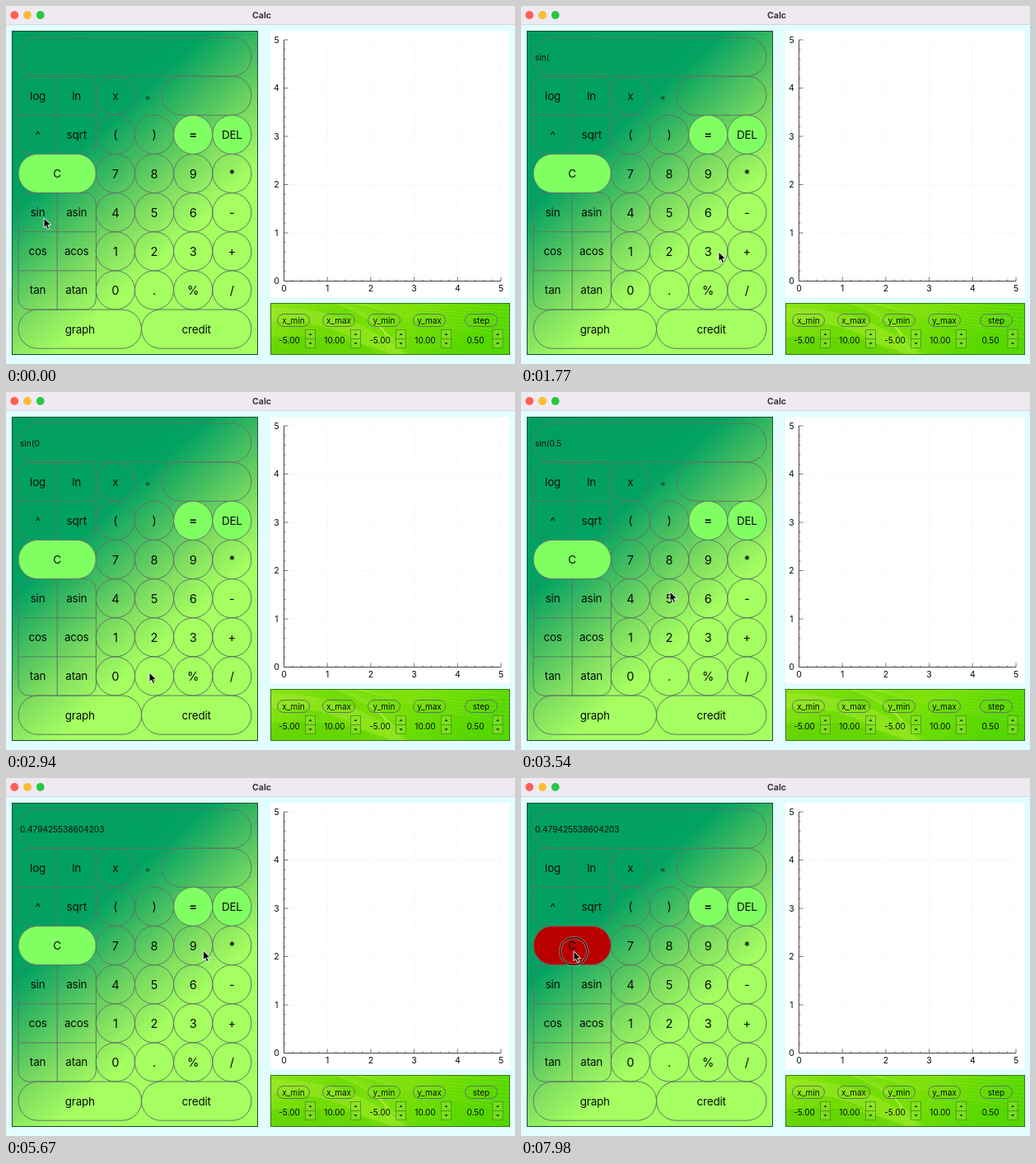
Animation of 618 by 434 pixels, one loop 8000 ms. Source, as an HTML page:

```html
<!DOCTYPE html>
<html lang="en">
<head>
<meta charset="utf-8">
<title>Calc</title>
<style>
  html, body { margin: 0; width: 100%; height: 100%; overflow: hidden; background: #e2fdff; }
  svg { display: block; }
  text { font-family: Inter, "Open Sans", sans-serif; font-size: 10px; fill: #050f08; dominant-baseline: central; text-anchor: middle; }
  .key { font-size: 13.4px; letter-spacing: -.15px; }
  .digit { font-size: 14.5px; }
  .bold { font-weight: 600; }
  .line { fill: none; stroke: #5d7766; stroke-width: 1; }
  .lit { fill: #80ff62; }
  .down { fill: #b90000; }
</style>
</head>
<body>
<svg id="stage" width="618" height="434" viewBox="0 0 618 434">
  <defs>
    <linearGradient id="face" gradientUnits="userSpaceOnUse" x1="7" y1="30" x2="337" y2="390">
      <stop offset="0" stop-color="#009f61"/>
      <stop offset=".33" stop-color="#02a262"/>
      <stop offset=".43" stop-color="#3dba61"/>
      <stop offset=".56" stop-color="#82df60"/>
      <stop offset=".67" stop-color="#a5ff61"/>
      <stop offset="1" stop-color="#a5ff61"/>
    </linearGradient>
    <linearGradient id="strip" x2="1" y2=".25">
      <stop offset="0" stop-color="#8ee517"/>
      <stop offset=".3" stop-color="#70dc04"/>
      <stop offset=".6" stop-color="#79e006"/>
      <stop offset="1" stop-color="#55d700"/>
    </linearGradient>
    <clipPath id="stripClip"><path d="M321 360H612V423H321Z"/></clipPath>
  </defs>
  <g id="scene"></g>
  <text id="entry" x="17" y="62" style="text-anchor:start;font-size:10.1px"></text>
  <g id="pointer">
    <g id="ring" fill="none">
      <circle r="16.5" stroke="#e8ffe8" stroke-opacity=".45" stroke-width="3"/>
      <circle r="16.5" stroke="#101010" stroke-width="1.3"/>
    </g>
    <path d="M0 0V11.6L2.6 9.2 4.5 13.6 6.7 12.7 4.8 8.4H8.5Z" fill="#000" stroke="#fff" stroke-width=".9"/>
  </g>
</svg>
<script>
const byId = id => document.getElementById(id);
const parts = [];
const rect = (x, y, w, h, attrs) =>
  parts.push(`<rect x="${x}" y="${y}" width="${w}" height="${h}" ${attrs}/>`);
const path = (d, attrs) => parts.push(`<path d="${d}" ${attrs}/>`);
const text = (x, y, label, attrs = '') =>
  parts.push(`<text x="${x}" y="${y}" ${attrs}>${label}</text>`);

const CELL = 47.15, LEFT = 15, TOP = 38;
const colX = c => LEFT + c * CELL;
const rowY = r => TOP + r * CELL;

function pill(x0, x1, row, label = '', cls = 'line', attrs = '', textClass = 'key') {
  const y = rowY(row);
  rect(x0, y, x1 - x0, CELL, `rx="23.5" class="line ${cls}" ${attrs}`);
  if (label) text((x0 + x1) / 2, y + CELL / 2, label, `class="${textClass}"`);
}

function keyBlock(row, rows) {
  const x = colX(0), y = rowY(row), h = rows.length * CELL;
  rect(x, y, 2 * CELL, h, 'rx="13" class="line"');
  path(`M${colX(1)} ${y}v${h}`, 'class="line"');
  rows.forEach((labels, r) => {
    if (r) path(`M${x} ${rowY(row + r)}h${2 * CELL}`, 'class="line"');
    labels.forEach((label, c) =>
      text(colX(c + .5), rowY(row + r + .5), label, 'class="key"'));
  });
}

function drawWindow() {
  rect(0, 0, 618, 434, 'fill="#e2fdff"');
  rect(0, 0, 618, 22.5, 'fill="#efeaf2"');
  path('M0 22.5H618', 'stroke="#d9d4dc"');
  ['#fe5f57', '#febc2e', '#28c840'].forEach((color, i) =>
    parts.push(`<circle cx="${10.3 + i * 15.7}" cy="11" r="4.9" fill="${color}"/>`));
  text(310.5, 11, 'Calc', 'style="font-weight:700;font-size:10.5px;fill:#38343b"');
}

function drawKeypad() {
  rect(7.5, 30.5, 298, 392, 'fill="url(#face)" stroke="#174d2d"');
  pill(colX(0), colX(6), 0);
  pill(189, colX(6), 1);
  keyBlock(1, [['log', 'ln'], ['^', 'sqrt']]);
  keyBlock(4, [['sin', 'asin'], ['cos', 'acos'], ['tan', 'atan']]);
  pill(colX(2), colX(3), 1, 'x');
  text(172, 110, '=');
  pill(colX(0), colX(2), 3, 'C', 'lit', 'id="clear"');
  ['( ) = DEL', '7 8 9 *', '4 5 6 -', '1 2 3 +', '0 . % /'].forEach((row, r) =>
    row.split(' ').forEach((label, c) => {
      const lit = label === '=' || label === 'DEL';
      const style = label === 'DEL' ? 'key' : /[=*]/.test(label) ? 'digit bold' : 'digit';
      pill(colX(c + 2), colX(c + 3), r + 2, label, lit ? 'lit' : '', '', style);
    }));
  pill(colX(0), 164.5, 7, 'graph');
  pill(164.5, colX(6), 7, 'credit');
}

function drawPlot() {
  const x0 = 337.5, y0 = 333.5, dx = 52.7, dy = 58.5;
  rect(321, 30, 291, 323, 'fill="#fff"');
  for (let i = 0; i <= 25; i++) {
    const major = i % 5 === 0, n = i / 5, x = x0 + n * dx, y = y0 - n * dy;
    const tick = major ? 5 : 2;
    if (major) {
      path(`M${x} 41V333M338 ${y}H601`, 'stroke="#ededed" stroke-dasharray="1 1.5" fill="none"');
      text(x, 342.5, n, 'style="font-size:10.5px"');
      text(328.5, y, n, 'style="font-size:10.5px"');
    }
    path(`M${x} ${y0}v${-tick}M${x0} ${y}h${tick}`, 'stroke="#555" stroke-width=".8"');
  }
  path(`M${x0} 41V${y0}H601`, 'fill="none" stroke="#444"');
}

function drawSettings() {
  rect(321, 360, 291, 63, 'fill="url(#strip)"');
  parts.push('<g clip-path="url(#stripClip)" fill="none">');
  path('M321 366Q420 364 486 423H450Q405 380 321 383Z', 'fill="#a6ec32" fill-opacity=".45"');
  path('M321 402Q400 393 470 423H321Z', 'fill="#5bd200" fill-opacity=".55"');
  for (let i = 0; i < 8; i++) {
    path(`M${392 + i * 5} 358Q${445 + i * 3} ${372 + i} ${490 - i * 4} 425`,
      `stroke="#c5f45c" stroke-width=".7" opacity="${.65 - i * .05}"`);
    path(`M${400 + i * 4} 359Q480 ${360 + i * 3} 614 ${366 + i * 5}`,
      'stroke="#b8f047" stroke-width=".6" opacity=".4"');
  }
  parts.push('</g>');
  rect(321.5, 360.5, 290, 62, 'fill="none" stroke="#38751b"');

  const fields = [[349, 'x_min', '-5.00'], [404, 'x_max', '10.00'], [459, 'y_min', '-5.00'],
    [514, 'y_max', '10.00'], [577, 'step', '0.50']];
  for (const [x, name, value] of fields) {
    const last = name === 'step', spin = x + (last ? 20 : 20.5);
    rect(x - 19.5, 373.5, 39, 15, 'rx="7.5" class="line"');
    text(x, 381, name);
    text(x - (last ? 7 : 5), 404.5, value);
    for (const [y, dir] of [[398, -1], [409, 1]]) {
      rect(spin - 6, y - 5.5, 12, 11, 'fill="#91e637" fill-opacity=".5" stroke="#4e9024" stroke-width=".8"');
      path(`M${spin - 2} ${y - dir}h4l-2 ${2.4 * dir}z`, 'fill="#173c08"');
    }
  }
}

drawWindow();
drawKeypad();
drawPlot();
drawSettings();
byId('scene').innerHTML = parts.join('');

const LOOP = 8000;
// [time, x, y]
const moves = [
  [0, 46, 257], [1470, 46, 257], [1770, 240, 298], [2220, 134, 346], [2610, 134, 346],
  [2940, 174, 340], [3030, 181, 346], [3180, 181, 346], [3390, 181, 248], [3480, 181, 248],
  [3540, 181, 242], [3840, 181, 160], [4050, 181, 160], [4290, 224, 155], [4500, 225, 154],
  [5340, 225, 154], [6120, 262, 296], [6480, 270, 320], [6900, 160, 262], [7140, 160, 262],
  [7440, 64, 210], [LOOP, 64, 210]
];
// [press, release]
const clicks = [[420, 540], [2310, 2430], [3060, 3150], [3390, 3480], [3930, 4020], [4590, 4710], [7980, LOOP]];
const entries = [[0, ''], [540, 'sin('], [2430, 'sin(0'], [3150, 'sin(0.'], [3480, 'sin(0.5'],
  [4020, 'sin(0.5)'], [4710, '0.479425538604203']];

function pointerAt(t) {
  const next = moves.findIndex(m => m[0] > t);
  const [t0, x0, y0] = moves[next - 1], [t1, x1, y1] = moves[next];
  const u = (t - t0) / (t1 - t0), e = u * u * (3 - 2 * u);
  return [x0 + (x1 - x0) * e, y0 + (y1 - y0) * e];
}

function render(now) {
  const t = now % LOOP;
  const pressed = clicks.some(([from, to]) => t >= from && t < to);
  byId('entry').textContent = entries.findLast(([from]) => t >= from)[1];
  byId('pointer').setAttribute('transform', `translate(${pointerAt(t)})`);
  byId('ring').style.display = pressed ? '' : 'none';
  byId('clear').setAttribute('class', `line ${t >= 7980 ? 'down' : 'lit'}`);
}

const start = performance.now();
function frame() {
  render(performance.now() - start);
  requestAnimationFrame(frame);
}
frame();
</script>
</body>
</html>
```
